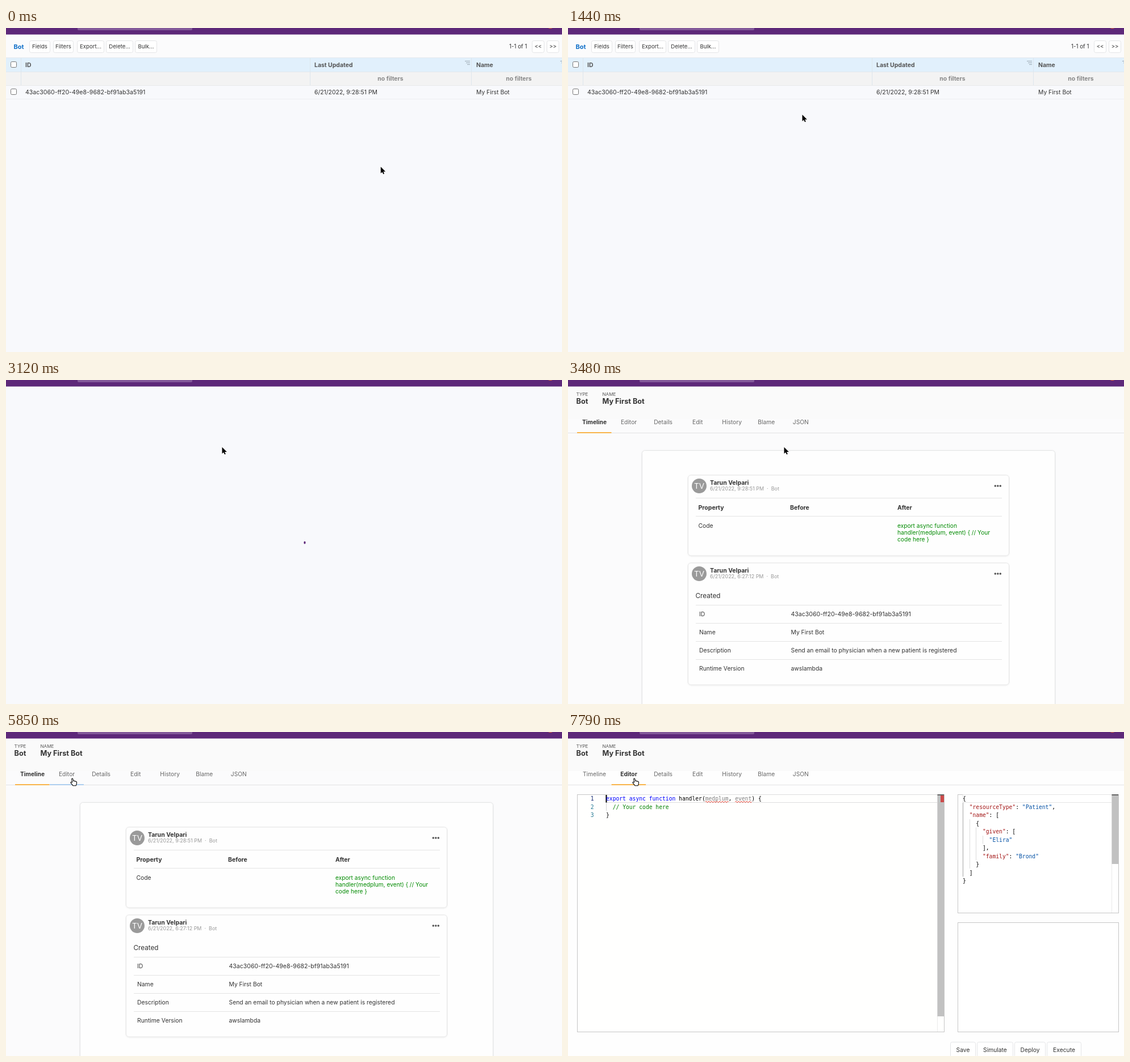
Recreate the animation shown at these times as an HTML page. Size 979 by 572 pixels, loop 8000 ms.

```html
<!DOCTYPE html>
<html lang="en">
<head>
<meta charset="utf-8">
<title>Bot editor</title>
<style>
  html, body { margin: 0; width: 100%; height: 100%; overflow: hidden; background: #f8f9fc; }
  svg { display: block; }
  text { font-family: Inter, Roboto, sans-serif; white-space: pre; }
  .mono text { font-family: "DejaVu Sans Mono", "Liberation Mono", monospace; font-size: 9.68px; fill: #000; }
  .kw { fill: #0000ff; }
  .note { fill: #008000; }
  .key { fill: #a31515; }
  .str { fill: #0451a5; }
  .plain tspan { fill: #000; }
  .checked .arg { fill: #808080; }
</style>
</head>
<body>
<svg id="stage" width="979" height="572" viewBox="0 0 979 572"></svg>
<script>
const CHAR = 5.83, LINE = 14.5;
const BOT_ID = '43ac3060-ff20-49e8-9682-bf91ab3a5191', ID_SIZE = { size: 10.57 };
const esc = s => s.replace(/&/g, '&amp;').replace(/</g, '&lt;').replace(/>/g, '&gt;');

const text = (x, y, s, { size = 10.35, fill = '#333', bold = 0, mid = 0 } = {}) =>
  `<text x="${x}" y="${y}" font-size="${size}" fill="${fill}" font-weight="${bold ? 700 : 400}"
    text-anchor="${mid ? 'middle' : 'start'}">${esc(s)}</text>`;
const rect = (x, y, w, h, fill, more = '') =>
  `<rect x="${x}" y="${y}" width="${w}" height="${h}" fill="${fill}" ${more}/>`;
const box = (x, y, w, h, stroke, r = 0, fill = '#fff', more = '') =>
  rect(x + .5, y + .5, w - 1, h - 1, fill, `stroke="${stroke}" rx="${r}" ${more}`);
const hline = (x, y, w, fill = '#e4e4e4') => rect(x, y, w, 1, fill);
const vline = (x, y, h, fill) => rect(x, y, 1, h, fill);
const group = (id, body, more = '') => `<g id="${id}" ${more}>${body}</g>`;
const button = (x, y, w, h, s, size) =>
  box(x, y, w, h, '#e4e5e7', 3) + text(x + w / 2, y + h / 2 + size * .36, s, { size, mid: 1 });

function topBar() {
  return rect(0, 0, 979, 11.5, '#5d2879') +
    rect(126, -6, 202, 10, '#83599a', 'rx="2"') +
    '<circle cx="958.5" cy="-7" r="8" fill="#e8703a"/>';
}

function listPage() {
  const head = { bold: 1, fill: '#555', size: 10.45 };
  const none = { bold: 1, fill: '#888', size: 10.4, mid: 1 };
  const check = y => box(8, y, 11, 11, '#767676', 2);
  const sortIcon = x => [0, 2, 4].map((d, i) => hline(x + d, 58 + i * 3, 9 - d, '#9aa6b0')).join('');
  const buttons = [[41, 37, 'Fields'], [83, 36, 'Filters'], [125, 48, 'Export...'], [176, 48, 'Delete...'],
    [227, 39, 'Bulk...'], [926, 22, '<<'], [952, 22, '>>']];
  return rect(0, 11, 979, 41, '#fbfbfc') +
    text(13.5, 36.7, 'Bot', { bold: 1, fill: '#1070c9', size: 11 }) +
    buttons.map(([x, w, s]) => button(x, 22, w, 22, s, 9.6)).join('') +
    text(886, 36, '1-1 of 1', { size: 9.8 }) +
    rect(0, 52, 979, 25, '#e1f0fc') + rect(0, 77, 979, 24, '#f3f3f3') +
    hline(0, 52, 979, '#e3e9ee') + hline(0, 77, 979, '#e2e8ed') + hline(0, 101, 979, '#e9eaeb') +
    group('hoverRow', rect(0, 101, 979, 24, '#eeeff1')) +
    hline(0, 125, 979, '#eeeff1') +
    [26, 535, 819].map(x => vline(x, 53, 48, '#dde6ed')).join('') +
    check(59) + check(107) + sortIcon(808) + sortIcon(976) +
    text(34, 69.3, 'ID', head) + text(543, 69.3, 'Last Updated', head) + text(828, 69.3, 'Name', head) +
    text(677, 93.3, 'no filters', none) + text(903, 93.3, 'no filters', none) +
    text(34, 117, BOT_ID, ID_SIZE) +
    text(543, 117, '6/21/2022, 9:28:51 PM', { size: 10.45 }) + text(828, 117, 'My First Bot');
}

const TABS = ['Timeline', 'Editor', 'Details', 'Edit', 'History', 'Blame', 'JSON'];
const tabX = i => 46.5 + i * 60.55;

function botHeader() {
  const label = { size: 8.15, fill: '#555' }, title = { size: 12.7, bold: 1 };
  return rect(0, 11, 979, 58, '#fafafa') +
    text(14.5, 28, 'TYPE', label) + text(60.5, 28, 'NAME', label) +
    text(14.5, 41.7, 'Bot', title) + text(60.5, 41.7, 'My First Bot', title) +
    hline(0, 93, 979, '#e2e3e4') +
    TABS.map((s, i) => text(tabX(i), 77.6, s, { size: 10.25, mid: 1, fill: '#666' })).join('') +
    rect(77, 92, 60, 1.8, '#a9cdf0', 'id="hoverBar"') + rect(16, 92, 60.5, 2, '#f9b44a', 'id="activeBar"');
}

function card(y, h, date) {
  const dots = [752.3, 756.8, 761.3].map(x => `<circle cx="${x}" cy="${y + 19.5}" r="1.8" fill="#555"/>`).join('');
  return box(211, y, 566, h, '#e6e6e6', 5, '#fefefe', 'filter="url(#soft)"') +
    `<circle cx="231" cy="${y + 19.5}" r="13" fill="#9a9a9a"/>` +
    text(231, y + 24.5, 'TV', { size: 13.5, fill: '#fff', mid: 1 }) +
    text(250, y + 17, 'Tarun Velpari', { bold: 1, size: 10.5 }) +
    text(250, y + 27.5, date + ' PM  ·  Bot', { size: 8.95, fill: '#999' }) + dots;
}

function timeline() {
  const head = { bold: 1, size: 10.5 }, green = { size: 10.2, fill: '#008a00' };
  const rows = [['ID', BOT_ID, ID_SIZE], ['Name', 'My First Bot'],
    ['Description', 'Send an email to physician when a new patient is registered'], ['Runtime Version', 'awslambda']];
  const code = ['export async function', 'handler(medplum, event) { // Your', 'code here }'];
  return box(130, 124, 728, 470, '#e4e5e6', 5, '#fefefe', 'filter="url(#soft)"') +
    card(167.5, 143, '6/21/2022, 9:28:51') + card(322.5, 216, '6/21/2022, 6:27:12') +
    hline(225, 208, 539) + hline(225, 240, 539) +
    text(229.5, 228.7, 'Property', head) + text(391, 228.7, 'Before', head) + text(580, 228.7, 'After', head) +
    text(229.5, 260.8, 'Code') + code.map((s, i) => text(580, 260.8 + i * 12.1, s, green)).join('') +
    text(224.5, 384.8, 'Created', { size: 11.7 }) +
    rows.map(([k, v, style], i) => hline(225, 397 + i * 32, 539) +
      text(231, 417.2 + i * 32, k) + text(392.5, 417.2 + i * 32, v, style)).join('');
}

function wave(x, w) {
  return `<path d="M${x} 123.4q1.2-2.6 2.4 0${'t2.4 0'.repeat(Math.round(w / 2.4) - 1)}" fill="none" stroke="#e51400" stroke-width=".9"/>`;
}

function editor() {
  const buttons = [[673, 45, 'Save'], [720, 64, 'Simulate'], [786, 55, 'Deploy'], [843, 61, 'Execute']];
  const span = (c, s) => `<tspan class="${c}">${s}</tspan>`;
  const codeLine = (x, i, s) => `<text x="${x}" y="${121 + i * LINE}">${s}</text>`;
  const number = i => `<text x="39.8" y="${121 + i * LINE}" style="fill:${i ? '#237893' : '#0b216f'}">${i + 1}</text>`;
  const code = [
    span('kw', 'export async function') + ' handler(' + span('arg', 'medplum') + ', ' + span('arg', 'event') + ') {',
    '  ' + span('note', '// Your code here'), '}'];
  const json = JSON.stringify({ resourceType: 'Patient', name: [{ given: ['Elira'], family: 'Brond' }] }, null, 2)
    .split('\n').map(s => s.replace(/"\w+"/g, (m, at, all) => span(all[at + m.length] === ':' ? 'key' : 'str', m)));
  const guides = [[0, 1, 9, '#a5a5a5'], [1, 3, 6, '#dcdcdc'], [2, 4, 4, '#dcdcdc'], [3, 5, 1, '#dcdcdc']];

  return box(16, 110, 647, 420, '#c6c6c6', 0, '#fffffe') + box(686, 110, 284, 210, '#c6c6c6') +
    box(686, 336, 284, 194, '#c6c6c6') +
    buttons.map(([x, w, s]) => button(x, 547, w, 28, s, 10.3)).join('') +
    group('firstLine', box(66, 110, 596, 15, '#dedede', 0, 'none') + vline(650, 111, 418, '#ebebeb') +
      number(0) + rect(66.5, 111, 2, 13.5, '#000'), 'class="mono"') +
    group('code', vline(67, 125, 14, '#d3d3d3') + number(1) + number(2) +
      code.map((s, i) => codeLine(67, i, s)).join(''), 'class="mono"') +
    group('json', box(695, 110, 263, 15, '#e4e4e4', 0, 'none') + vline(957, 111, 208, '#ebebeb') +
      guides.map(([c, r, n, f]) => vline(695 + Math.round(c * 2 * CHAR), 110.5 + r * LINE, n * LINE, f)).join('') +
      json.map((s, i) => codeLine(695, i, s)).join(''), 'class="mono"') +
    group('bars', rect(650.5, 111, 11.5, 391, '#c1c1c1') + rect(957.5, 111, 11.5, 122, '#c1c1c1') +
      rect(650.5, 110, 11.5, 2, '#666') + rect(957.5, 110, 11.5, 2, '#666')) +
    group('errors', wave(241.9, 41) + wave(294.4, 29) + rect(656, 112, 6, 12, '#cc4a4a'));
}

const ARROW = 'M0 0V11.6L2.7 9.2 4.5 13.1 6.3 12.3 4.6 8.4H8.4Z';
const HAND = 'M3.2 7.6 2.2 1.9Q2.4.4 3.6.9 4.3 1.2 5.4 5.4 6.6 4.4 7.4 5.7 8.7 4.9 9.3 6.3 10.9 5.9 11 8 11.1 10.5 9.6 13.5H4.4Q2.6 10.7.6 8.6.1 7.3 1.3 7.2 2.3 7.3 3.2 7.6Z';

const stage = document.getElementById('stage');
stage.innerHTML =
  '<filter id="soft" x="-5%" y="-5%" width="110%" height="112%"><feDropShadow dx="0" dy=".6" stdDeviation="1" flood-opacity=".1"/></filter>' +
  rect(0, 0, 979, 572, '#f8f9fc', 'id="back"') +
  group('list', listPage()) +
  '<circle id="loader" cx="489.5" cy="286" r="36.5" fill="none" stroke="#5d2879" stroke-width="3" stroke-linecap="round"/>' +
  group('bot', botHeader()) + group('timeline', timeline()) + group('editor', editor()) + topBar() +
  `<path id="arrow" d="${ARROW}" fill="#000" stroke="#fff" stroke-width="1.2" paint-order="stroke"/>` +
  `<path id="hand" d="${HAND}" fill="#fff" stroke="#000" stroke-width="1.1" stroke-linejoin="round"/>`;

const $ = id => document.getElementById(id);
const show = (id, on) => $(id).style.display = on ? '' : 'none';
const tabs = [...document.querySelectorAll('#bot text')].slice(-TABS.length);

// start, end, then the pointer's tip on arrival
const MOVES = [[470, 1000, 516, 203], [1210, 1440, 412.5, 153], [1640, 1980, 384.5, 122.5],
  [2430, 2580, 380.5, 118.5], [5055, 5310, 178, 82], [5510, 5850, 117, 82]];
const ease = p => p * p * (3 - 2 * p);

function pointer(t) {
  let x = 659.8, y = 245;
  for (const [from, to, nx, ny] of MOVES) {
    const p = ease(Math.min(1, Math.max(0, (t - from) / (to - from))));
    x += (nx - x) * p;
    y += (ny - y) * p;
  }
  return [x, y];
}

function draw(t) {
  const [x, y] = pointer(t);
  const onRow = t >= 2460 && t < 3090, onTab = t >= 3480 && y < 93;
  const active = t >= 6410 ? 1 : 0;
  const hover = Math.floor((x - 16.5) / 60.55);

  show('list', t < 3090);
  show('hoverRow', onRow);
  show('loader', t >= 3090 && t < 3480);
  show('bot', t >= 3480);
  show('timeline', t >= 3480 && !active);
  show('editor', t >= 6440);
  show('firstLine', t >= 7390);
  show('code', t >= 7450);
  show('json', t >= 7530);
  show('bars', t >= 7590);
  show('errors', t >= 7790);
  $('code').setAttribute('class', 'mono' + (t < 7500 ? ' plain' : t >= 7790 ? ' checked' : ''));
  $('json').setAttribute('class', 'mono' + (t < 7590 ? ' plain' : ''));
  $('back').setAttribute('fill', t < 3480 ? '#f8f9fc' : active ? '#fefefe' : '#fbfbfc');

  const spin = Math.max(0, t - 3120), grow = ease(Math.min(1, spin / 700));
  $('loader').setAttribute('stroke-dasharray', `${1.8 + 179 * grow} 400`);
  $('loader').setAttribute('stroke-dashoffset', -27 * grow);
  $('loader').setAttribute('transform', `rotate(${spin / 1400 * 360} 489.5 286)`);

  tabs.forEach((tab, i) => {
    tab.setAttribute('font-weight', i === active ? 700 : 400);
    tab.setAttribute('fill', i === active ? '#333' : '#666');
  });
  $('activeBar').setAttribute('x', 16 + active * 60.6);
  show('hoverBar', onTab && hover !== active);
  $('hoverBar').setAttribute('x', 16.4 + hover * 60.55);

  show('arrow', !onRow && !onTab);
  show('hand', onRow || onTab);
  $('arrow').setAttribute('transform', `translate(${x} ${y})`);
  $('hand').setAttribute('transform', `translate(${x - 3.5} ${y - .8})`);
}

const begin = performance.now();
(function tick() {
  draw((performance.now() - begin) % 8000);
  requestAnimationFrame(tick);
})();
</script>
</body>
</html>
```
